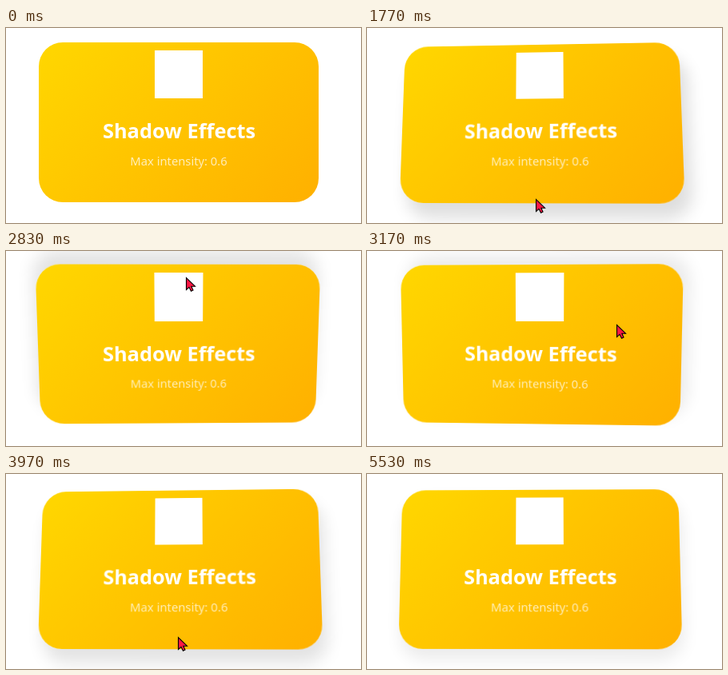
An HTML page for the animation above (5560 ms loop, 444x244 px).

```html
<!DOCTYPE html>
<html lang="en">
<head>
<meta charset="utf-8">
<title>Shadow Effects</title>
<style>
  html, body { margin: 0; width: 100%; height: 100%; overflow: hidden; background: #fff; }
  #stage { position: absolute; left: 0; top: 0; width: 444px; height: 244px; overflow: hidden; }
  #card {
    position: absolute; left: 41px; top: 18px; width: 350px; height: 200px;
    border-radius: 30px; background: linear-gradient(135deg, #ffd700, #ffb000);
  }
  #card svg { display: block; }
  text { font-family: "Noto Sans", "Open Sans", sans-serif; fill: #fff; text-anchor: middle; }
  .title { font-size: 25.4px; font-weight: 700; }
  .note { font-size: 14.75px; fill-opacity: .72; }
  #cursor { position: absolute; left: 0; top: 0; overflow: visible; }
</style>
</head>
<body>
<div id="stage">
  <div id="card">
    <svg width="350" height="200">
      <rect x="145" y="10" width="60" height="60" fill="#fff"/>
      <text class="title" x="175.5" y="119.5">Shadow Effects</text>
      <text class="note" x="175" y="154">Max intensity: 0.6</text>
    </svg>
  </div>
  <svg id="cursor" width="14" height="20">
    <path d="M.5 .5V15.5L4 12.3L6.5 17.2L9 16L6.8 11.2H11.5Z" fill="#ff1744" stroke="#000" stroke-width="1.1"/>
  </svg>
</div>
<script>
const LOOP = 5560, ENTER = 770, LEAVE = 4640, REENTER = 5440;
const MAX_TILT = 8, LAG = 110;
const card = document.getElementById('card');
const cursor = document.getElementById('cursor');

// key points of the pointer's clockwise rounds
const path = [
  { t: ENTER, x: 427, y: 227 },
  { t: 1170, x: 367, y: 202 },
  { t: 1470, x: 367, y: 202 },
  { t: 2000, x: 66, y: 192 },
  { t: 2230, x: 41, y: 83 },
  { t: 2830, x: 225, y: 33 },
  { t: 3530, x: 359, y: 177 },
  { t: 4270, x: 95, y: 206 },
  { t: 4570, x: 57, y: 194 },
  { t: 4720, x: 10, y: 246 }
];
const END = path[path.length - 1].t;

const clamp = (v, lo, hi) => Math.min(hi, Math.max(lo, v));

function ease(t, from, to) {
  const u = clamp((t - from) / (to - from), 0, 1);
  return u * u * (3 - 2 * u);
}

const rate = (a, b, axis) => (b[axis] - a[axis]) / (b.t - a.t);

// zero at turning points, so the curve never overshoots there
function slope(i, axis) {
  if (i === 0 || i === path.length - 1) return 0;
  const a = rate(path[i - 1], path[i], axis), b = rate(path[i], path[i + 1], axis);
  return a * b > 0 ? (a + b) / 2 : 0;
}

function pointer(t, axis) {
  t = clamp(t, ENTER, END);
  let i = 0;
  while (t > path[i + 1].t) i++;
  const a = path[i], b = path[i + 1], d = b.t - a.t;
  const u = (t - a.t) / d, v = 1 - u;
  return a[axis] * v * v * (1 + 2 * u) + b[axis] * u * u * (3 - 2 * u)
    + d * u * v * (slope(i, axis) * v - slope(i + 1, axis) * u);
}

// tilt as a share of the maximum, following the pointer with a delay
function tiltAt(t) {
  if (t >= REENTER) {
    const u = clamp((t - REENTER) / 90, 0, 1);
    return [.12 * u, .62 * u];
  }
  const seen = Math.min(t, LEAVE) - LAG;
  const on = ease(t, 800, 1050) * (1 - ease(t, LEAVE, 4900));
  const nx = clamp((pointer(seen, 'x') - 216) / 175, -1, 1);
  const ny = clamp((pointer(seen, 'y') - 118) / 100, -1, 1);
  return [nx * on, ny * on];
}

function draw(t) {
  const [nx, ny] = tiltAt(t);
  const alpha = .13 * Math.hypot(nx, ny);
  card.style.transform =
    `perspective(600px) rotateX(${ny * MAX_TILT}deg) rotateY(${-nx * MAX_TILT}deg)`;
  card.style.boxShadow = `${nx * 20}px ${ny * 20}px 20px rgba(0,0,0,${alpha})`;

  cursor.style.visibility = t >= ENTER && t < END ? 'visible' : 'hidden';
  cursor.style.transform =
    `translate(${Math.round(pointer(t, 'x'))}px, ${Math.round(pointer(t, 'y'))}px)`;
}

const start = performance.now();
function tick() {
  draw((performance.now() - start) % LOOP);
  requestAnimationFrame(tick);
}
tick();
</script>
</body>
</html>
```
